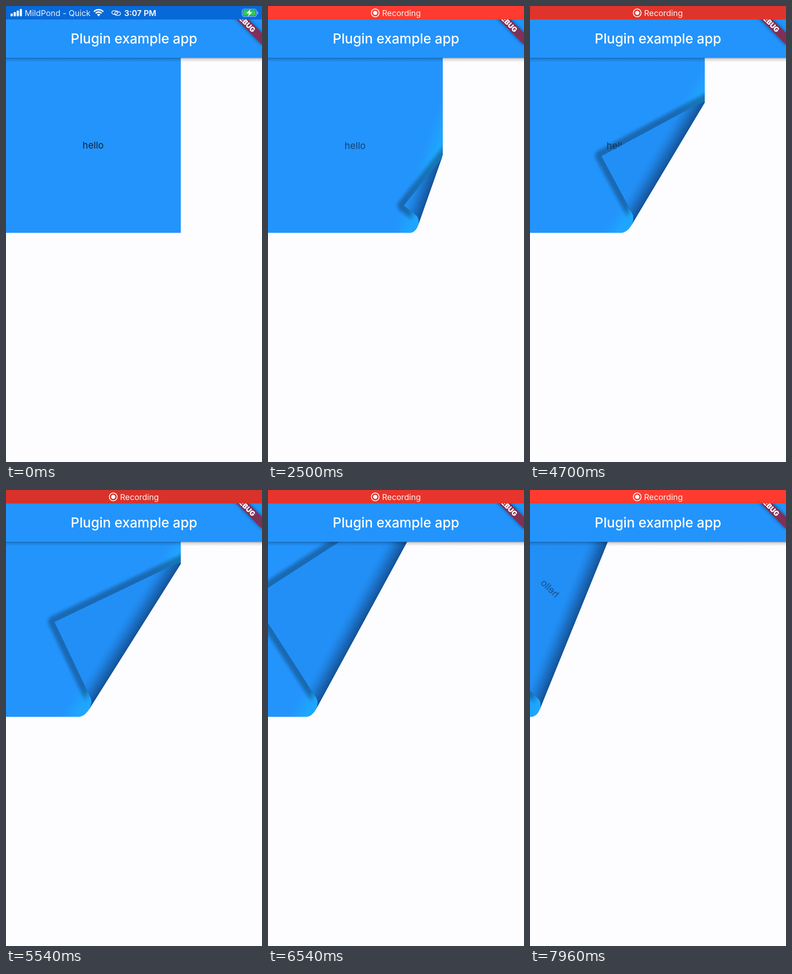
Animation of 561 by 998 pixels, one loop 8000 ms. Source, as an HTML page with a canvas:

```html
<!DOCTYPE html>
<html lang="en">
<head>
<meta charset="utf-8">
<title>Page curl</title>
<style>
  html, body { margin: 0; width: 100%; height: 100%; overflow: hidden; background: #fdfcff; }
  canvas { display: block; width: 561px; height: 998px; }
</style>
</head>
<body>
<canvas id="stage" width="561" height="998"></canvas>
<script>
const W = 561, H = 998, LOOP = 8000;
const PAGE_W = 383, TOP = 113, BOTTOM = 496.5, ROWS = 384;
const CURL_START = 900, RECORD_START = 500;
const RADIUS = 11, LIFT = 14;
const FONT = 'Inter, Roboto, sans-serif';
const BLUE = [35, 148, 252], BACK = [34, 143, 246], DARK = [17, 70, 132];
const PAPER = [253, 252, 255], INK = [14, 42, 76];

// time, fold angle in degrees, distance of the fold from the top left corner
const POSES = [
  [900, 17, 560], [2500, 19.4, 469.8], [3580, 21.1, 395.5], [4700, 30.9, 437.1],
  [6100, 31.3, 373.3], [7080, 24.5, 253], [7960, 22.1, 200.5], [8000, 22, 199]
];

const ctx = document.getElementById('stage').getContext('2d');
const image = ctx.createImageData(PAGE_W, ROWS);
const clamp = (v, lo = 0, hi = 1) => Math.min(hi, Math.max(lo, v));
const mix = (a, b, k) => a + (b - a) * k;
const rgb = c => `rgb(${c.map(Math.round)})`;
function smooth(a, b, v) {
  const k = clamp((v - a) / (b - a));
  return k * k * (3 - 2 * k);
}

function text(c, str, x, y, size, weight, color, align = 'left') {
  c.font = `${weight} ${size}px ${FONT}`;
  c.textAlign = align;
  c.fillStyle = color;
  c.fillText(str, x, y);
}

function makeInk() {
  const c = document.createElement('canvas');
  c.width = PAGE_W;
  c.height = ROWS;
  const g = c.getContext('2d');
  text(g, 'hello', 191, 313 - TOP, 20.5, 400, '#000', 'center');
  return g.getImageData(0, 0, PAGE_W, ROWS).data;
}
const ink = makeInk();

// Bilinear coverage of the label at a point of the page
function inkAt(x, y) {
  if (x < 150 || x > 232 || y < 285 || y > 325) return 0;
  const fx = x - 0.5, fy = y - TOP - 0.5;
  const i = Math.floor(fx), j = Math.floor(fy);
  const at = (a, b) => ink[(b * PAGE_W + a) * 4 + 3];
  const upper = mix(at(i, j), at(i + 1, j), fx - i);
  const lower = mix(at(i, j + 1), at(i + 1, j + 1), fx - i);
  return mix(upper, lower, fy - j) / 255;
}

function slope(i, n) {
  const a = POSES[Math.max(i - 1, 0)], b = POSES[Math.min(i + 1, POSES.length - 1)];
  return (b[n] - a[n]) / (b[0] - a[0]);
}

function pose(t) {
  let i = 0;
  while (i < POSES.length - 2 && t >= POSES[i + 1][0]) i++;
  const a = POSES[i], b = POSES[i + 1], span = b[0] - a[0];
  const k = clamp((t - a[0]) / span), k2 = k * k, k3 = k2 * k;
  return [1, 2].map(n =>
    (2 * k3 - 3 * k2 + 1) * a[n] + (3 * k2 - 2 * k3) * b[n] +
    span * ((k3 - 2 * k2 + k) * slope(i, n) + (k3 - k2) * slope(i + 1, n)));
}

const cover = (x, y) =>
  clamp(PAGE_W - x + 0.5) * clamp(x + 0.5) * clamp(BOTTOM - y + 0.5) * clamp(y - TOP + 0.5);

function curledPage(t) {
  const [deg, fold] = pose(t);
  const a = deg * Math.PI / 180, dx = Math.cos(a), dy = Math.sin(a);
  const axis = fold - RADIUS;
  const lifted = clamp((PAGE_W * dx + BOTTOM * dy - axis) / 30);
  const out = image.data;

  // Undo the roll: page point seen at (x, y) for a given turn around the cylinder
  const unroll = (x, y, q, turn, extra) => {
    const along = RADIUS * turn + extra - q;
    const lift = LIFT * (1 - Math.cos(turn));
    return [x + along * dx - lift * dy, y + along * dy + lift * dx];
  };

  for (let j = 0, o = 0; j < ROWS; j++) {
    for (let i = 0; i < PAGE_W; i++, o += 4) {
      const x = i + 0.5, y = j + TOP + 0.5;
      const q = x * dx + y * dy - axis, e = RADIUS - q;
      let r = PAPER[0], g = PAPER[1], b = PAPER[2];
      if (e > -0.5) {
        const edge = clamp(e + 0.5);
        const turn = q > 0 ? Math.asin(Math.min(1, q / RADIUS)) : 0;
        const [fx, fy] = q > 0 ? unroll(x, y, q, turn, 0) : [x, y];
        const [bx, by] = unroll(x, y, q, Math.PI - turn, q > 0 ? 0 : -q);

        const front = cover(fx, fy) * edge;
        if (front > 0) {
          const glow = 1 - smooth(10, 50, e);
          const overX = Math.max(bx - PAGE_W, -bx, 0);
          const overY = Math.max(by - BOTTOM, TOP - by, 0);
          const fade = overY > overX ? smooth(8, 32, e) : 1;
          const shade = 1 - 0.29 * lifted * fade * (1 - smooth(6, 21, Math.hypot(overX, overY)));
          const k = 0.78 * inkAt(fx, fy);
          r = mix(r, mix(BLUE[0] - 5 * glow, INK[0], k) * shade, front);
          g = mix(g, mix(BLUE[1] + 18 * glow, INK[1], k) * shade, front);
          b = mix(b, mix(BLUE[2] + 3 * glow, INK[2], k) * shade, front);
        }

        const back = cover(bx, by) * edge;
        if (back > 0) {
          const light = Math.pow(smooth(-14, 44, e), 0.9);
          const k = 0.65 * inkAt(bx, by);
          r = mix(r, mix(mix(DARK[0], BACK[0], light), INK[0], k), back);
          g = mix(g, mix(mix(DARK[1], BACK[1], light), INK[1], k), back);
          b = mix(b, mix(mix(DARK[2], BACK[2], light), INK[2], k), back);
        }
      }
      out[o] = r;
      out[o + 1] = g;
      out[o + 2] = b;
      out[o + 3] = 255;
    }
  }
  ctx.putImageData(image, 0, TOP);
}

function flatPage() {
  ctx.fillStyle = rgb(BLUE);
  ctx.fillRect(0, TOP, PAGE_W, BOTTOM - TOP);
  text(ctx, 'hello', 191, 312, 20.5, 400, '#10203c', 'center');
}

function appBar() {
  const g = ctx.createLinearGradient(0, 113, 0, 123);
  g.addColorStop(0, 'rgba(0,0,0,.34)');
  g.addColorStop(0.35, 'rgba(0,0,0,.13)');
  g.addColorStop(1, 'rgba(0,0,0,0)');
  ctx.fillStyle = g;
  ctx.fillRect(0, 113, W, 10);
  ctx.fillStyle = rgb(BLUE);
  ctx.fillRect(0, 0, W, 113.5);
  text(ctx, 'Plugin example app', 280.5, 82, 29.7, 500, '#fff', 'center');
}

function debugBanner() {
  ctx.save();
  ctx.translate(W, 0);
  ctx.rotate(Math.PI / 4);
  ctx.shadowColor = 'rgba(0,0,0,.5)';
  ctx.shadowBlur = 9;
  ctx.fillStyle = '#7f3058';
  ctx.fillRect(-59.8, 41.9, 119.7, 18);
  ctx.shadowColor = 'transparent';
  text(ctx, 'DEBUG', 0, 56.4, 15.3, 900, '#fff', 'center');
  ctx.restore();
}

function roundBox(x, y, w, h, r) {
  ctx.beginPath();
  ctx.roundRect(x, y, w, h, r);
}

function phoneStatus() {
  ctx.fillStyle = '#0769d7';
  ctx.fillRect(0, 0, W, 29.5);
  ctx.fillStyle = '#fff';
  for (let i = 0; i < 4; i++) {
    const h = 6 + i * 3.3;
    roundBox(10 + i * 6.7, 22.5 - h, 4.8, h, 1.2);
    ctx.fill();
  }
  text(ctx, 'MildPond - Quick', 41, 22, 17.65, 400, '#e8f2ff');
  text(ctx, '3:07 PM', 259, 22, 17.6, 600, '#fff');

  // wifi
  ctx.strokeStyle = '#fff';
  ctx.lineWidth = 3.2;
  for (const r of [8.8, 14]) {
    ctx.beginPath();
    ctx.arc(203, 22, r, -Math.PI * 0.76, -Math.PI * 0.24);
    ctx.stroke();
  }
  ctx.fillStyle = '#fff';
  ctx.beginPath();
  ctx.moveTo(203, 23);
  ctx.arc(203, 22, 5, -Math.PI * 0.76, -Math.PI * 0.24);
  ctx.fill();

  // link
  ctx.lineWidth = 1.5;
  roundBox(232, 10.5, 13, 7.6, 3.8);
  ctx.stroke();
  roundBox(238, 12.8, 13, 7.6, 3.8);
  ctx.stroke();

  // battery
  ctx.strokeStyle = 'rgba(255,255,255,.55)';
  roundBox(517.5, 7, 31.5, 16, 4.5);
  ctx.stroke();
  ctx.fillStyle = 'rgba(255,255,255,.55)';
  roundBox(550.5, 12, 2, 6, 1);
  ctx.fill();
  ctx.fillStyle = '#35c759';
  roundBox(519.5, 9, 27.5, 12, 2.8);
  ctx.fill();
  ctx.fillStyle = '#fff';
  ctx.beginPath();
  [[535.5, 7], [527, 16], [532.5, 16], [530.5, 23], [539.5, 13.5], [534, 13.5]]
    .forEach(p => ctx.lineTo(...p));
  ctx.fill();
}

function recordingStatus(t) {
  const k = clamp(0.5 + 0.6 * Math.cos((t - 3000) / 4950 * 2 * Math.PI));
  ctx.fillStyle = rgb([mix(217, 255, k), mix(50, 59, k), mix(43, 48, k)]);
  ctx.fillRect(0, 0, W, 29.5);
  ctx.strokeStyle = ctx.fillStyle = '#fff';
  ctx.lineWidth = 1.8;
  ctx.beginPath();
  ctx.arc(235, 15, 8.6, 0, 7);
  ctx.stroke();
  ctx.beginPath();
  ctx.arc(235, 15, 4.6, 0, 7);
  ctx.fill();
  text(ctx, 'Recording', 250, 22, 17.65, 400, '#fff4f2');
}

function draw(t) {
  ctx.fillStyle = rgb(PAPER);
  ctx.fillRect(0, 0, W, H);
  if (t < CURL_START) flatPage();
  else curledPage(t);
  appBar();
  debugBanner();
  if (t < RECORD_START) phoneStatus();
  else recordingStatus(t);
}

const begin = performance.now();
function tick() {
  draw((performance.now() - begin) % LOOP);
  requestAnimationFrame(tick);
}
tick();
</script>
</body>
</html>
```
